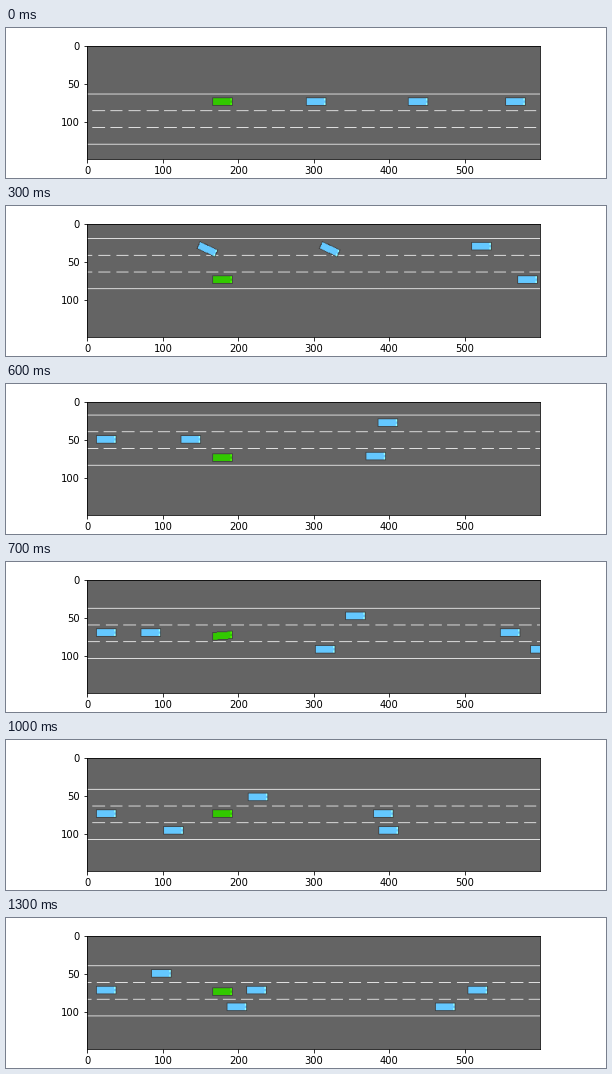
Write a matplotlib script that moves like this. It is 600 px wide and 150 px high and loops after 1.4 s.

```python
import matplotlib.pyplot as plt
import numpy as np
from matplotlib.animation import FuncAnimation

STEPS, INTERVAL = 14, 100
W, H = 600, 150
LANE = 22
SCALE = 5.5                                  # pixels per metre
STRIPE_PERIOD, STRIPE_LENGTH = 4.33 * SCALE, 3 * SCALE
CAR_LENGTH, CAR_WIDTH = 27, 11
EGO_X, EGO_Y = 179, 75

ROAD, WHITE, OUTLINE = (100, 100, 100), (255, 255, 255), (60, 60, 60)
GREEN, GREEN_LIGHT = (50, 200, 0), (73, 255, 0)
BLUE, BLUE_LIGHT = (100, 200, 255), (147, 255, 255)

# Speed relative to the green car, in pixels per step
CRUISE = {0: -43, 1: -56, 2: -67}
# (lane, time, x) of cars that hold their lane's cruising speed
STEADY = [(2, 6, 382), (1, 10, 392), (2, 10, 399), (2, 13, 474), (1, 13, 517)]
# Key times and positions of cars met while the green car still accelerates
MERGING = [([0, 1, 3, 5], [303, 278, 159, 25]),
           ([0, 1, 3, 6, 9], [438, 415, 321, 137, -22])]
LEADER = ([0, 1, 3, 6, 13], [567, 558, 522, 398, 98])
# Lane changes of the green car
EGO_LANE = ([0, 1, 2, 3, 6, 7, 10, 13],
            [0, 0.96, 2, 2, 2.09, 1.18, 1, 1.09])

Y, X = np.mgrid[0:H, 0:W]


def ego_lane(t):
    return np.interp(t, *EGO_LANE)


def ego_distance(t):
    """Metres driven while the speed settles at its limit."""
    return 29.93 * t - 4.85 * (1 - np.exp(-t / 1.045))


def merge(t):
    """Eased move from lane 0 to lane 1: lane and tilt in degrees."""
    u = np.clip((t - 2.4) / 2, 0, 1)
    return u * u * (3 - 2 * u), 120 * u * (1 - u)


def draw_road(img, top, shift):
    img[[top, top + 3 * LANE]] = WHITE
    dashes = (np.arange(W) - shift) % STRIPE_PERIOD < STRIPE_LENGTH
    for row in (top + LANE, top + 2 * LANE):
        img[row, dashes] = WHITE


def draw_car(img, x, y, tilt=0, color=BLUE, light=BLUE_LIGHT):
    dx = X - np.floor(x)
    dy = Y + 1 - np.floor(y)
    c, s = np.cos(np.radians(tilt)), np.sin(np.radians(tilt))
    along, across = c * dx + s * dy, np.abs(c * dy - s * dx)
    edge = np.minimum(CAR_LENGTH / 2 - np.abs(along), CAR_WIDTH / 2 - across)
    img[edge > 0] = color
    img[(edge > 0) & (along > 10.5) & (across > 1.5) & (across < 4.5)] = light
    img[(edge > 0) & (edge < 1)] = OUTLINE


def render(t):
    img = np.full((H, W, 3), ROAD, dtype=np.uint8)
    top = int(round(64 - LANE * ego_lane(t)))
    draw_road(img, top, 6.6 - SCALE * ego_distance(t))

    def lane_y(lane):
        return top + LANE * (lane + 0.5)

    lane, tilt = merge(t)
    for path in MERGING:
        draw_car(img, np.interp(t, *path), lane_y(lane), tilt)
    draw_car(img, np.interp(t, *LEADER), lane_y(0))
    for lane, when, x in STEADY:
        draw_car(img, x + CRUISE[lane] * (t - when), lane_y(lane))

    ego_tilt = 4 * round(ego_lane(t) - ego_lane(t - 1))
    draw_car(img, EGO_X, EGO_Y, ego_tilt, GREEN, GREEN_LIGHT)
    return img


plt.rcParams.update({"font.family": "DejaVu Sans", "font.size": 10})
fig, ax = plt.subplots(figsize=(W / 72, H / 72), dpi=72, facecolor="white")
fig.subplots_adjust(left=0.125, right=0.9, bottom=0.125, top=0.88)
picture = ax.imshow(render(0))
ax.set_xticks(range(0, 600, 100))
ax.set_yticks(range(0, 150, 50))


def update(step):
    picture.set_data(render(step))
    return [picture]


anim = FuncAnimation(fig, update, frames=STEPS, interval=INTERVAL,
                     repeat=True, repeat_delay=0, blit=False)
plt.show()
```
